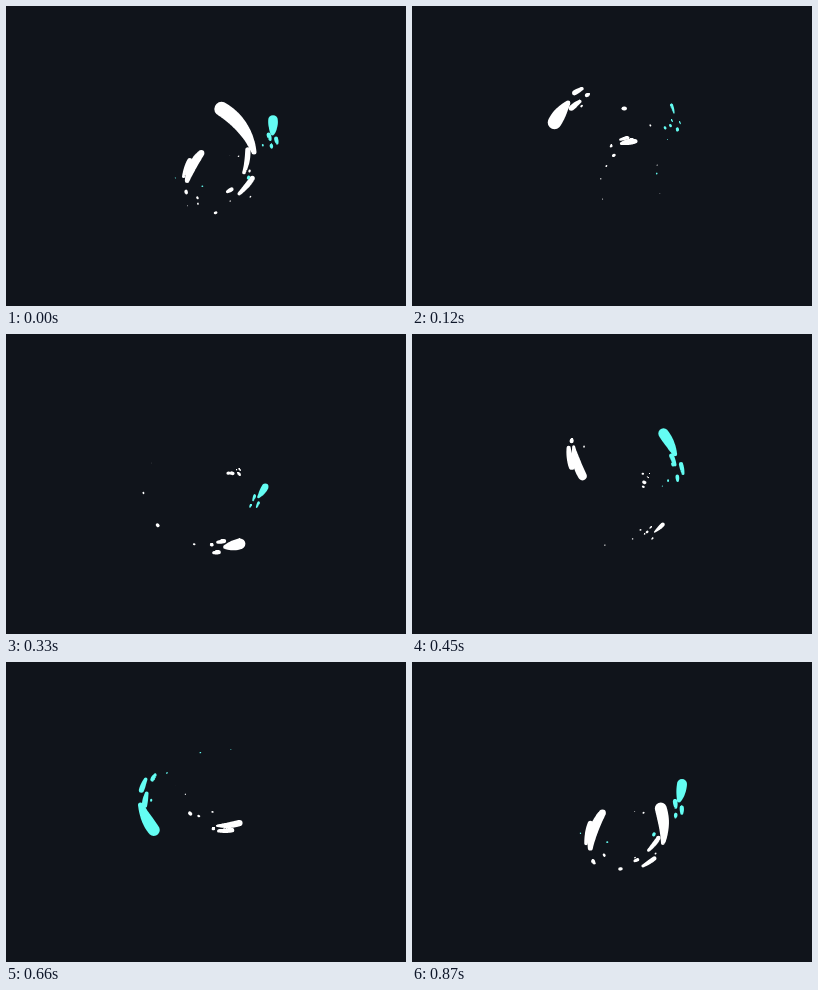
Write an HTML page with a canvas that moves like this. It is 400 px wide and 300 px high and loops after 0.9 s.

```html
<!DOCTYPE html>
<html lang="en">
<head>
<meta charset="utf-8">
<title>Liquid swirl</title>
<style>
  html, body { margin: 0; width: 100%; height: 100%; overflow: hidden; background: #10141b; }
  canvas { display: block; width: 400px; height: 300px; }
</style>
</head>
<body>
<canvas id="stage" width="400" height="300"></canvas>
<script>
const LOOP = 900, STEP = 30, TAU = 2 * Math.PI;
const WHITE = '#ffffff', CYAN = '#64fdf3', BACK = '#10141b';
const ctx = document.getElementById('stage').getContext('2d');
const mix = (a, b, p) => a + (b - a) * p;

let seed = 11;
const random = () => (seed = seed * 16807 % 2147483647) / 2147483647;

// Nearest equivalent of an angle to a reference angle.
const unwrap = (a, ref) => a - Math.round((a - ref) / TAU) * TAU;

// Key points: time, head x, head y, tail x, tail y, half width.
// Both ends orbit (cx, cy). Side strands: start and end along the body
// (0 head, 1 tail), radial offset, share of the width.
function makeSweep({ color, cx, cy, taper, belly, keys, sides }) {
  let head, tail;
  const poses = keys.map(([t, hx, hy, tx, ty, w]) => {
    const ha = Math.atan2(hy - cy, hx - cx), ta = Math.atan2(ty - cy, tx - cx);
    head = unwrap(ha, head ?? ha);
    tail = unwrap(ta, tail ?? head);
    return [t, head, Math.hypot(hx - cx, hy - cy), tail, Math.hypot(tx - cx, ty - cy), w];
  });
  const sweep = { color, cx, cy, taper, belly, poses, sides };
  sweep.drops = shed(sweep);
  return sweep;
}

function poseAt({ poses }, t) {
  const i = poses.findIndex(k => t < k[0]);
  if (i < 1) return null;
  const a = poses[i - 1], b = poses[i];
  const p = (t - a[0]) / (b[0] - a[0]);
  const [, ha, hr, ta, tr, w] = a.map((v, n) => mix(v, b[n], p));
  return { ha, hr, ta, tr, w };
}

function pointAt({ cx, cy }, { ha, hr, ta, tr }, u, offset) {
  const angle = mix(ha, ta, u), r = mix(hr, tr, Math.min(u, 1)) + offset;
  return [cx + r * Math.cos(angle), cy + r * Math.sin(angle)];
}

// Small drops left behind the tail at regular intervals.
function shed(sweep) {
  const drops = [], { poses } = sweep;
  for (let born = poses[0][0] + 60; born < poses.at(-1)[0] - 60; born += 45) {
    const pose = poseAt(sweep, born);
    const [x, y] = pointAt(sweep, pose, 1 + random() * 0.4, -14 * random());
    const heading = pose.ta + Math.sign(pose.ha - pose.ta) * Math.PI / 2;
    drops.push({ born, x, y, heading, life: 120 + 100 * random(), size: 1 + 2 * random() ** 2 });
  }
  return drops;
}

function drawStroke(sweep, pose, from, to, offset, w, taper, belly) {
  if (w < 0.2) return;
  // Surface tension: thin strands pull together into round drops.
  const a = pointAt(sweep, pose, from, offset), far = pointAt(sweep, pose, to, offset);
  const length = Math.hypot(far[0] - a[0], far[1] - a[1]);
  const end = mix(from, to, Math.min(1, 3.2 * w * w / length));
  const b = pointAt(sweep, pose, end, offset);
  ctx.beginPath();
  for (let n = 0; n <= 56; n++) {
    const u = n / 56, arc = pointAt(sweep, pose, mix(from, end, u), offset);
    const [x, y] = arc.map((v, i) => mix(v, mix(a[i], b[i], u), 0.4));
    const r = w * mix(1, taper, u ** 1.6) * (1 + belly * Math.sin(Math.PI * u));
    ctx.moveTo(x + r, y);
    ctx.arc(x, y, r, 0, TAU);
  }
  ctx.fill();
}

function drawBody(sweep, t) {
  const pose = poseAt(sweep, t);
  if (!pose) return;
  ctx.fillStyle = sweep.color;
  drawStroke(sweep, pose, 0, 1, 0, pose.w, sweep.taper, sweep.belly);
  for (const [from, to, offset, share] of sweep.sides)
    drawStroke(sweep, pose, from, to, offset, pose.w * share, 0.7, 0.1);
}

function drawDrops({ color, drops }, t) {
  ctx.fillStyle = color;
  for (const { born, x, y, heading, life, size } of drops) {
    const p = (t - born) / life;
    if (p < 0 || p >= 1) continue;
    const r = size * Math.sqrt(1 - p), d = 8 * p;
    ctx.beginPath();
    ctx.ellipse(x + d * Math.cos(heading), y + d * Math.sin(heading), r * 1.15, r * 0.87, heading, 0, TAU);
    ctx.fill();
  }
}

const sweeps = [
  {
    color: CYAN, cx: 203, cy: 149, taper: 0.42, belly: 0.1,
    keys: [
      [285, 252, 165, 251, 167, 0],
      [330, 259.3, 152.7, 252.5, 163, 3.2],
      [450, 251.5, 99.5, 263, 120, 5.2],
      [540, 180, 85, 218, 84, 6.2],
      [660, 147.8, 168, 134.5, 143, 6],
      [780, 243, 172, 190, 187, 6.3],
      [870, 270, 122, 267, 138.5, 5],
      [900, 267, 114, 266.5, 127.5, 4.8],
      [1020, 259.5, 99, 263, 112, 1.6],
      [1100, 258, 95, 260, 106, 0]
    ],
    sides: [[1, 1.45, -4, 0.45], [1.5, 1.9, 2, 0.42], [2, 2.2, -4, 0.35]]
  },
  {
    color: WHITE, cx: 203, cy: 149, taper: 0.35, belly: 0.1,
    keys: [
      [690, 192, 214, 186, 214, 0],
      [780, 239, 197, 221, 209.5, 4.5],
      [870, 248.8, 146.5, 251, 181, 6],
      [900, 215.5, 103, 248, 146, 7.2],
      [1020, 142.5, 116.5, 156, 97, 6.8],
      [1125, 155, 200, 137, 173, 6],
      [1230, 234, 209.8, 219, 213, 5.4],
      [1350, 250.8, 190.6, 242.6, 198, 2],
      [1430, 253, 184, 247, 193, 0]
    ],
    sides: [[0.95, 1.45, -6, 0.37], [1.45, 1.8, 4, 0.35], [1.85, 1.95, -4, 0.27]]
  },
  {
    color: WHITE, cx: 221, cy: 176, taper: 0.75, belly: 0.5,
    keys: [
      [725, 193, 212, 194, 213, 0],
      [780, 179, 181, 186.7, 206.5, 3.5],
      [870, 190.5, 151, 179, 190, 3.4],
      [900, 195.3, 147.2, 181, 178, 3.1],
      [1020, 223.5, 135.3, 204, 139.8, 2.1],
      [1230, 234, 141, 231, 138, 1],
      [1400, 237, 145, 236, 144, 0]
    ],
    sides: [[0.35, 0.9, 4, 0.75], [1.2, 1.25, 2, 0.55]]
  },
  {
    color: WHITE, cx: 208, cy: 118, taper: 0.35, belly: 0.15,
    keys: [
      [375, 161, 104, 161, 100, 0],
      [450, 170.5, 142, 161.7, 112.7, 4.4],
      [660, 233.5, 161, 211, 163.8, 3.1],
      [780, 246.6, 150.7, 242.5, 157, 2.1],
      [840, 249, 146, 247, 150, 0]
    ],
    sides: [[0.4, 0.95, 5, 0.7], [1.15, 1.2, 3, 0.45]]
  }
].map(makeSweep);

function draw(t) {
  ctx.fillStyle = BACK;
  ctx.fillRect(0, 0, 400, 300);
  // Sweeps that cross the loop point are also drawn one loop later.
  for (const part of [drawBody, drawDrops])
    for (const sweep of sweeps)
      for (const time of [t, t + LOOP]) part(sweep, time);
}

const start = performance.now();
function tick() {
  const t = (performance.now() - start) % LOOP;
  draw(Math.floor(t / STEP) * STEP);
  requestAnimationFrame(tick);
}
tick();
</script>
</body>
</html>
```
